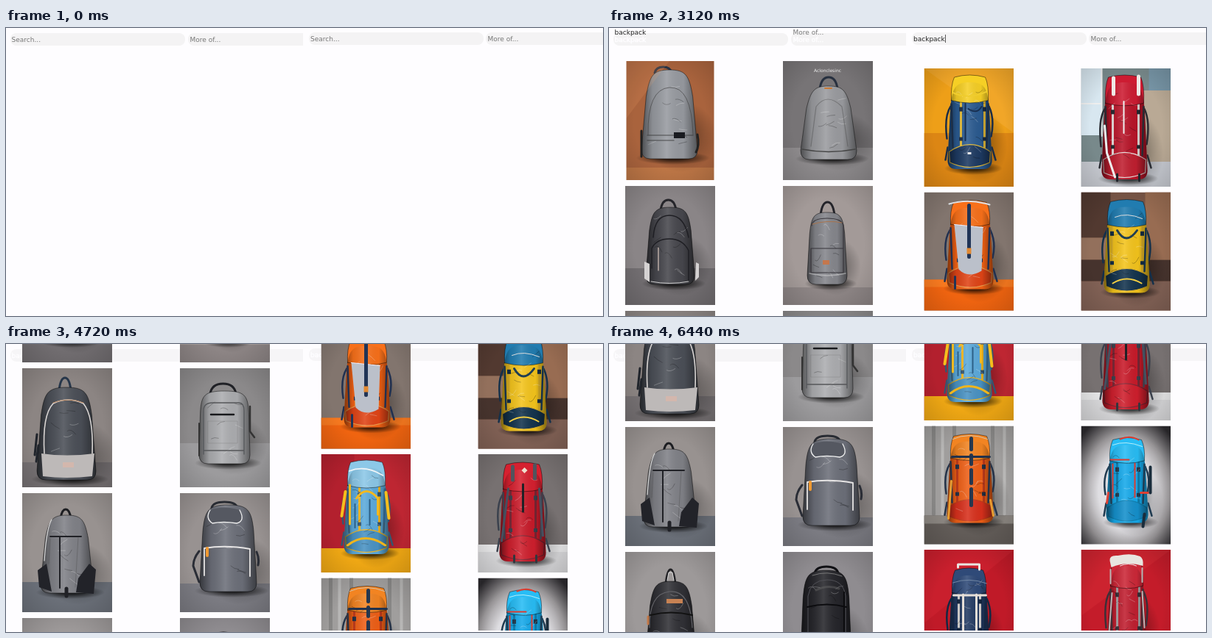
An HTML page for the animation above (6480 ms loop, 810 by 392 pixels).

```html
<!DOCTYPE html>
<html lang="en">
<head>
<meta charset="utf-8">
<title>Backpack search</title>
<style>
  html, body { margin: 0; width: 100%; height: 100%; overflow: hidden; background: #fefdff; }
  svg { display: block; }
  text { font: 9px "DejaVu Sans", Verdana, sans-serif; }
  .ghost { fill: #fefdff; stroke: #fefdff; stroke-width: .5; }
  .print { font-size: 6px; fill: #eee; }
</style>
</head>
<body>
<svg id="stage" width="810" height="392">
  <defs>
    <linearGradient id="shade">
      <stop offset="0" stop-opacity=".5"/>
      <stop offset=".2" stop-opacity=".08"/>
      <stop offset=".45" stop-color="#fff" stop-opacity=".12"/>
      <stop offset=".75" stop-opacity=".03"/>
      <stop offset="1" stop-opacity=".45"/>
    </linearGradient>
    <radialGradient id="edge" r=".8">
      <stop offset=".5" stop-opacity="0"/>
      <stop offset="1" stop-opacity=".2"/>
    </radialGradient>
    <radialGradient id="drop">
      <stop offset=".3" stop-opacity=".65"/>
      <stop offset="1" stop-opacity="0"/>
    </radialGradient>
    <radialGradient id="glow" cy=".55" r=".68">
      <stop offset=".45" stop-color="#dfdee2"/>
      <stop offset=".72" stop-color="#9a9799"/>
      <stop offset="1" stop-color="#2c2a2e"/>
    </radialGradient>
  </defs>
</svg>
<script>
const stage = document.getElementById('stage');
const LOOP = 6480, STEP = 40;

let seed = 7;
const rand = () => (seed = seed * 16807 % 2147483647) / 2147483647;

const fill = (d, color) => `<path d="${d}" fill="${color}"/>`;
const line = (d, color, w) =>
  `<path d="${d}" fill="none" stroke="${color}" stroke-width="${w}" stroke-linecap="round" stroke-linejoin="round"/>`;

// "color width path|..." ; width 0 means a filled path
const parts = s => !s ? '' : s.split('|').map(p => {
  const [color, w, ...d] = p.split(' ');
  return +w ? line(d.join(' '), color, w) : fill(d.join(' '), color);
}).join('');

// Rounded bag outline; t narrows the shoulders
const hull = (x, y, w, h, t) => {
  const b = y + h, r = x + w, m = x + w / 2, s = y + h * .3, n = t * .4, k = w * .06 + t * .7;
  return `M${x} ${b - 12}Q${x} ${b} ${x + 12} ${b}H${r - 12}Q${r} ${b} ${r} ${b - 12}` +
    `L${r - n} ${s}C${r - t * .7} ${y + h * .06} ${r - k} ${y} ${m} ${y}` +
    `C${x + k} ${y} ${x + t * .7} ${y + h * .06} ${x + n} ${s}Z`;
};

const folds = (x, y, w, h, n) => {
  let s = '';
  for (let i = 0; i < n; i++) {
    const px = x + w * (.12 + rand() * .6), py = y + h * (.15 + rand() * .75);
    s += line(`M${px} ${py}q${w * .06} ${rand() * 10 - 5} ${w * .14} ${rand() * 16 - 8}`, i % 2 ? '#0004' : '#fff4', 1);
  }
  return s;
};

const shadow = (x, y, rx, ry, o) =>
  `<ellipse cx="${x}" cy="${y}" rx="${rx}" ry="${ry}" fill="url(#drop)" opacity="${o}"/>`;

const photo = (bg, floor, fy, back, [x, y, w, h], bag) =>
  `<rect width="122" height="162" fill="${bg}"/>` +
  `<rect y="${fy}" width="122" height="162" fill="${floor}"/>` + parts(back) +
  `<rect width="122" height="162" fill="url(#edge)"/>` +
  shadow(x + w * .7, y + h * .75, w * .65, h * .4, .5) + shadow(x + w / 2 + 5, y + h - 1, w * .66, 9, 1) + bag;

const dayPack = (bg, floor, fy, box, color, [hx, hy, hw], grip, extra) => {
  const y = box[1], d = hull(...box);
  return photo(bg, floor, fy, '', box,
    line(`M${hx} ${y + 4}Q${hx + 2} ${hy} ${hx + hw / 2} ${hy}T${hx + hw} ${y + 4}`, grip, 3) +
    fill(d, color) + folds(...box.slice(0, 4), 10) + fill(d, 'url(#shade)') + line(d, '#0007', 1) + parts(extra));
};

const hikePack = (bg, floor, fy, back, box, [lid, body, base, strap, trim], xs, extra) => {
  const [x, y, w, h] = box, r = x + w, m = x + w / 2, top = y + h * .27, low = y + h * .77;
  const main = hull(x, y + 10, w, h - 10, 9);
  const cap = `M${x + 5} ${top}Q${x + 4} ${y + 14} ${x + 9} ${y + 3}Q${m} ${y - 3} ${r - 9} ${y + 3}` +
    `Q${r - 4} ${y + 14} ${r - 5} ${top}Q${m} ${top + 7} ${x + 5} ${top}Z`;
  const pocket = `M${x + 2} ${low + 6}Q${m} ${low - 14} ${r - 2} ${low + 6}L${r - 3} ${y + h - 9}` +
    `Q${m} ${y + h + 4} ${x + 3} ${y + h - 9}Z`;
  const side = line(`M${x + 4} ${top + 8}Q${x - 5} ${top + 22} ${x - 1} ${low - 12}M${r - 4} ${top + 8}` +
    `Q${r + 4} ${top + 25} ${r - 1} ${low - 15}M${x} ${low}l-3 17M${r} ${low}l5 17`, strap, 2.5);
  const belts = xs.map(c => line(`M${c} ${top - 8}V${low}`, trim, 3) +
    `<rect x="${c - 2.5}" y="${top + 9}" width="5" height="6" fill="${strap}"/>` +
    `<rect x="${c - 2.5}" y="${low - 14}" width="5" height="5" fill="${strap}"/>`).join('');
  return photo(bg, floor, fy, back, box, side + fill(main, body) + belts +
    fill(pocket, base) + line(pocket, trim, 1.2) + fill(cap, lid) + folds(...box, 16) +
    fill(main, 'url(#shade)') + line(cap, '#0007', 1) +
    line(`M${x + 5} ${top + 5}L${x + 7} ${low}M${r - 5} ${top + 5}L${r - 7} ${low}`, strap, 2.5) + parts(extra));
};

const days = [
  dayPack('#a9633d', '#bd7646', 145, [22, 12, 76, 121, 16], '#979aa0', [40, 8, 23], '#283344',
    '#f9ab7022 0 M0 0H60L0 80Z|#444a 1 M31 100Q30 38 60 36T92 100|#3338 1.5 M30 108H66M30 101H92|#191b20 0 M66 97h15v8h-15z|#222 3 M22 95V130M98 100q3 15 -2 24|#fefdff 0 M0 0h1.5v162h-1.5zM120.5 0h2v162h-2z'),
  dayPack('#777476', '#8c898b', 118, [24, 34, 76, 100, 20], '#9a9b9f', [50, 22, 24], '#27303f',
    '#4446 1.2 M38 116L45 62Q60 42 80 62L88 116|#444 1.5 M26 120Q62 127 98 120|#c87834 2 M57 37h9') +
    '<text class="print" x="42" y="15">Aclonclesinc</text>',
  dayPack('#8a8587', '#716d70', 112, [28, 29, 66, 105, 12], '#47474d', [48, 19, 21], '#25252a',
    '#1f1f24 1.5 M36 112V85Q42 72 60 72T86 88V130M38 70Q40 40 60 40T86 70|#d9c7bd 1.2 M45 84V115|#d5d2d2 0 M26 103l7 3v25l-7 -5zM96 104l4 2v18l-5 5z|#ccc 1 M35 130Q60 135 86 130'),
  dayPack('#a39a98', '#8d8585', 138, [33, 36, 54, 98, 8], '#85868c', [51, 22, 19], '#24242a',
    '#37343a 1.2 M39 54Q40 44 60 44T82 54V118M38 85H82V118H38Z|#aa744d 1 M40 52Q60 46 80 50|#c4774d 0 M54 101h9v6h-9z|#ddd7 1.5 M36 119Q60 125 85 119'),
  dayPack('#8c8583', '#777274', 128, [20, 26, 80, 126, 14], '#4b4f57', [50, 13, 16], '#26364a',
    '#bdb9b8 0 M26 116Q60 121 98 116L95 147Q60 151 28 147Z|#d9d5d3 1.6 M30 116Q27 64 42 48Q62 38 83 48Q97 65 95 116|#bd8961 1 M42 47Q62 39 83 47|#d3b7ad 0 M55 128h15v7h-15z|#20242b 3 M20 90L17 118M22 105l-3 22'),
  dayPack('#8b898a', '#9c9b9d', 102, [26, 31, 69, 99, 4], '#acadb0', [41, 21, 35], '#202126',
    '#55575a 1.3 M32 117V58Q32 47 44 47H80Q87 47 87 58V117M32 112H87|#18191c 2.5 M42 63H73|#333 2.5 M95 52V86l6 8|#333 2 M26 75V119|#7775 1 M38 72H78V102H38Z'),
  dayPack('#989290', '#6b7079', 121, [25, 30, 71, 106, 16], '#808187', [52, 22, 14], '#1d1e22',
    '#202126 2 M38 59H80M51 60V129|#222329 0 M21 105l12 -9l7 38l-17 -6zM100 104l-9 -8l-15 20l-3 19l24 2z|#ddd 1.2 M40 36Q33 47 30 92|#4445 1 M76 60L72 128M38 62L36 96|#202126 5 M60 130v10'),
  dayPack('#989291', '#7b7b82', 123, [27, 16, 77, 118, 10], '#6c6f79', [43, 12, 35], '#292c33',
    '#555861 0 M41 23Q60 16 81 23Q89 38 77 41Q59 38 44 41Q34 34 41 23Z|#eee 1.3 M41 23Q34 34 44 41Q59 38 77 41Q89 38 81 23|#e6e4e4 1.8 M33 112V75Q62 70 95 76V113|#f09a32 4 M37 75v10|#2a2d36 3 M26 79q-8 10 -8 20l8 22M104 80q4 9 2 18'),
  dayPack('#9d9999', '#888486', 120, [28, 40, 68, 112, 14], '#313136', [55, 24, 13], '#202024',
    '#ddd 1 M57 39l2 -11h5l2 11|#646469 1.2 M33 103Q32 57 60 54T91 103|#c78253 0 M56 64h22v6h-22z|#111 2 M34 86Q62 79 91 86|#c27848 3 M31 88v10'),
  dayPack('#8f8c90', '#747277', 120, [24, 25, 69, 131, 8], '#26262b', [43, 20, 32], '#101014',
    '#505056 1 M34 120V60Q38 38 60 38T85 60V120|#0b0b0e 2 M33 75Q60 68 86 75M83 55V135|#777 1 M40 32Q60 25 80 33|#6667 3 M45 52Q60 44 76 50')
];

const hikes = [
  hikePack('#ee9f18', '#dc8614', 88, '#f7b3455a 0 M0 0H122V88Z', [32, 9, 60, 128],
    ['#f6cf25', '#2a5a90', '#1d3a62', '#1b2d46', '#e7be3b'], [50, 82],
    '#182f50 2 M56 48V98M60 55Q72 63 78 52|#efcc2e 2 M39 33Q60 43 84 32|#e4e5e9 0 M59 114h5v3h-5z'),
  hikePack('#78898b', '#c6c9d0', 127, '#d8e7f0 0 M0 0H28V91H0Z|#b9a995 0 M83 30H122V127H83Z|#7795a6 0 M92 0H122V30H92Z|#eee 2 M28 0V92M0 48H28', [28, 9, 62, 142],
    ['#cd1c32', '#b81428', '#c01f30', '#282b32', '#e9dfdd'], [43, 78],
    '#efe8e5 5 M44 13V35M78 11V35|#eee 3 M32 78L35 115L46 148|#21242b 3 M49 144v9M79 144v9|#eee 2 M58 45V88'),
  hikePack('#82756e', '#f06410', 119, '#fa8c2d88 0 M0 119H122V129H0Z', [31, 11, 63, 121],
    ['#f8701a', '#f46214', '#e04416', '#203050', '#f09c4c'], [47, 77],
    '#bbc0ca 0 M41 44L80 48L78 107Q60 118 47 105Z|#eef 1 M41 44L80 48|#203456 5 M61 18V88|#e28932 0 M58 76h6v8h-6z|#dce0e5 2 M34 16Q60 8 89 17|#203456 3 M42 115v16'),
  hikePack('#795647', '#816155', 121, '#523930 0 M0 0H40V62H0Z|#93705c 0 M0 62H40V92H0Z|#46332d 0 M0 92H122V121H0Z|#986c52 0 M87 0H122V92H87Z', [31, 10, 62, 127],
    ['#217cb0', '#f4c41c', '#14344e', '#14304a', '#e5b728'], [42, 83],
    '#203e52 3 M49 52Q61 73 76 52|#f3ce42 2 M43 124Q62 112 82 124|#ddd 1 M46 34Q62 27 83 36'),
  hikePack('#b3202e', '#f0a814', 128, '#c92c3888 0 M45 0H122V128H45Z', [31, 8, 61, 128],
    ['#8cc8e8', '#5caadb', '#4a93c4', '#35566e', '#f3b71f'], [52, 79],
    '#f4b91f 3 M48 60Q61 41 77 60V82M39 42V95|#eff5f8 1.5 M38 23Q60 14 84 29|#2c5f86 2 M46 68V100M66 62V96M86 48V92|#f6be1c 4 M33 51L28 84M88 52L92 87|#f0b51c 3 M36 124Q60 105 87 124'),
  hikePack('#777171', '#d7d7d9', 123, '#fff5 0 M0 123H122V133H0Z', [29, 11, 63, 135],
    ['#d6202f', '#c81a29', '#cf1f2d', '#3a414d', '#7b2634'], [44, 78],
    '#50545d 5 M47 17V35M77 15V33|#202126 3 M61 41V78|#f0dfce 0 M63 18l4 4l-4 4l-4 -4z|#33363d 3 M49 138v9M79 138v9|#46505f 3 M41 47L32 118M83 47L88 111'),
  hikePack('#a09e9d', '#625c58', 122, '#66666670 5 M13 0V120M41 0V120M93 0V120|#ddd6 4 M25 0V120M109 0V120|#8a8580 0 M0 122H122V133H0Z', [31, 11, 63, 121],
    ['#f28422', '#ee5f16', '#d8301c', '#243248', '#c23c1c'], [45, 81],
    '#26374e 5 M64 17V32M64 40V52M64 60V78M64 86V108|#e89d31 3 M37 75L33 126M90 101l4 21|#d7c1a5 1 M39 18Q61 8 86 18|#22324c 3 M38 42H89'),
  hikePack('url(#glow)', 'none', 162, '', [34, 16, 57, 116],
    ['#28bdf5', '#16a9ea', '#1590cc', '#1f3a50', '#0f7fb0'], [49, 78],
    '#dc3c30 2 M40 46H65M43 52V98M73 51V97M53 18Q66 12 78 19|#dc4135 3 M37 91l-2 14M81 91h10|#1a2d3c 4 M94 56v35M86 120l-2 17|#b7edf8 1 M43 26Q60 19 83 28'),
  hikePack('#c01a28', '#b01a28', 132, '#dc2c3855 0 M0 0H122L0 100Z', [33, 25, 56, 124],
    ['#2f4a78', '#223a62', '#223352', '#152742', '#d9d6d3'], [47, 76],
    '#e9e5e1 3 M46 24V20H75V27|#e6dfd8 3 M40 62H84M53 61V110M71 61V110|#7187a4 1 M39 45Q61 37 85 46'),
  hikePack('#c41c2a', '#b01a28', 132, '#dc303a55 0 M0 0H122L0 90Z', [35, 12, 54, 138],
    ['#cc2838', '#c01f30', '#ac1a2b', '#3c3038', '#a8a0a2'], [49, 79],
    '#e8e5e0 0 M39 15Q38 7 50 8Q68 4 80 9Q85 12 84 22Q62 15 41 24Z|#eee 1 M53 22Q64 17 75 22|#bdb5b5 2 M40 27V46M83 25V44M42 59L38 112M83 57L86 106')
];

const easeOut = u => 1 - (1 - u) ** 2.23;
const smooth = u => u * u * (3 - 2 * u);
const linear = u => u;

const panels = [
  { x: 7.5, base: 19, more: 249.5, top: 7, pills: [6, 247], w: 403, h: 392, cols: [22, 236], size: [122, 162], pitch: 170, cards: days,
    shown: i => 2320 + 40 * Math.min(i, 4),
    moves: [[3080, 3120, 10, linear], [3120, 3840, 181, easeOut], [4080, 4720, 362, smooth], [4880, 5400, 452, easeOut]] },
  { x: 413, base: 18, more: 653.5, top: 6, pills: [411, 651], w: 810, h: 390, cols: [427.5, 640.5], size: [121.5, 161], pitch: 168.5, cards: hikes,
    shown: i => i < 2 ? 1920 : 2200 + 40 * Math.min(i - 1, 4),
    moves: [[3560, 3880, 55, smooth], [4080, 4720, 242, smooth], [4880, 6240, 449, easeOut]] }
];

const label = (x, y, s, cls) => `<text class="${cls}" x="${x}" y="${y}" fill="#777">${s}</text>`;

for (const p of panels) {
  const cards = p.cards.map((c, i) => `<svg class="card" x="${p.cols[i % 2]}" y="${55 + p.pitch * (i >> 1)}" ` +
    `width="${p.size[0]}" height="${p.size[1]}">${c}</svg>`).join('');
  stage.insertAdjacentHTML('beforeend', `<svg width="${p.w}" height="${p.h}">
    <g class="bar">${p.pills.map(x => `<rect x="${x}" y="${p.top}" width="237" height="17" rx="8" fill="#f4f3f4"/>`).join('')}</g>
    <g class="trace">${label(p.x, p.base, 'backpack', 'ghost')}${label(p.more, p.base, 'More of...', 'ghost')}</g>
    <g class="page">${label(p.x, p.base, 'Search...', 'query')}${label(p.more, p.base, 'More of...', '')}
      <rect class="caret" y="${p.base - 9}" width=".8" height="11" fill="#333"/>${cards}</g></svg>`);
  const root = stage.lastElementChild;
  for (const k of ['bar', 'trace', 'page', 'query', 'caret']) p[k] = root.querySelector('.' + k);
  p.photos = [...root.querySelectorAll('.card')];
}

const scrollAt = (moves, t) => {
  let pos = 0;
  for (const [a, b, to, ease] of moves)
    if (t > a) pos += (to - pos) * ease(Math.min(1, (t - a) / (b - a)));
  return pos;
};
const show = (el, on) => el.setAttribute('visibility', on ? 'visible' : 'hidden');

function draw(now) {
  const t = Math.floor(now % LOOP / STEP) * STEP, typed = t >= 1440;
  panels.forEach((p, side) => {
    const y = scrollAt(p.moves, t);
    p.page.setAttribute('transform', `translate(0 ${-y})`);
    p.query.textContent = typed ? 'backpack' : 'Search...';
    p.query.setAttribute('fill', typed ? '#222' : '#777');
    p.caret.setAttribute('x', p.x + (typed ? 43 : 0));
    show(p.caret, t >= 720 && (side || !y));
    show(p.trace, y > 0);
    p.bar.setAttribute('opacity', t >= 4120 ? .7 : 1);
    p.photos.forEach((c, i) => show(c, t >= p.shown(i)));
  });
}

const start = performance.now();
const tick = () => { draw(performance.now() - start); requestAnimationFrame(tick); };
tick();
</script>
</body>
</html>
```
